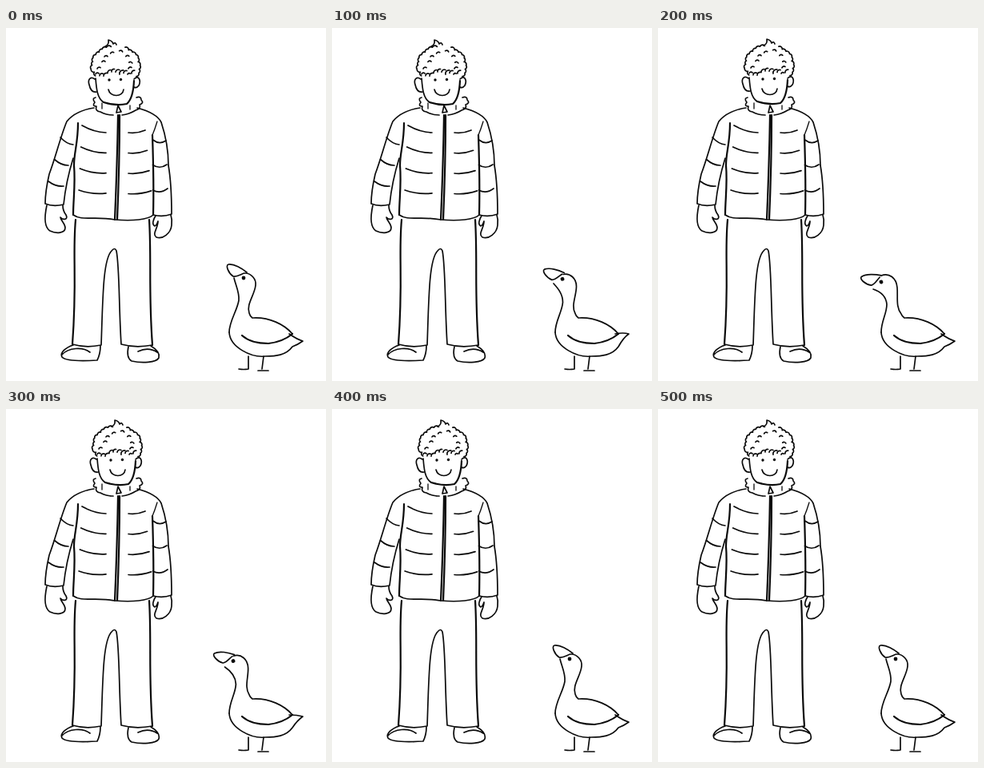
These frames come from a looping animation (400 by 442 pixels, 0.6 s). An HTML page:

```html
<!DOCTYPE html>
<html lang="en">
<head>
<meta charset="utf-8">
<title>Looking at the goose</title>
<style>
html, body { margin: 0; width: 100%; height: 100%; overflow: hidden; background: #fff; }
svg { display: block; width: 100vw; height: 100vh; }
path { fill: none; stroke: #0b0b0b; stroke-width: 1.7; stroke-linecap: round; stroke-linejoin: round; }
.bold { stroke-width: 2.2; }
.fine { stroke-width: 1.3; }
circle { fill: #0b0b0b; }
</style>
</head>
<body>
<svg viewBox="0 0 400 442">
  <g id="jacket">
    <path d="M110 100C97 102 84 107 76 117C68 136 62 162 54 183C51 196 49 208 49 220C56 223 64 223 72 221Q75 192 84 163"/>
    <path class="bold" d="M90 119C90 145 85 155 85 172C87 195 84 215 84 234"/>
    <path d="M84 234C95 242 110 235 136 240C158 242 178 240 184 234"/>
    <path d="M164 100C179 104 190 110 194 118C200 136 203 155 203 172C207 195 207 215 207 233Q196 237 184 234"/>
    <path class="bold" d="M183 134C184 165 185 195 184 234"/>
    <path class="fine" d="M189 117Q186 127 183 134"/>
    <path class="bold" d="M140 109Q139 170 136 240M142 109Q142 170 139 240"/>
    <path id="quilting"/>
  </g>
  <g id="mittens">
    <path d="M51 222C48 236 47 249 55 254C63 258 74 257 74 250C74 245 69 242 68 237C72 241 78 240 75 234Q71 229 71 222"/>
    <path d="M187 235C184 240 182 246 186 248C189 247 189 244 190 242C190 251 182 258 188 262C196 265 206 257 207 247Q208 240 206 234"/>
  </g>
  <g id="trousers">
    <path class="bold" d="M87 240C83 285 89 315 83 396M179 240C182 290 178 330 183 397"/>
    <path d="M83 396Q100 401 119 397C121 340 121 290 132 279Q136 274 138 279C142 300 141 350 144 396Q162 401 183 397"/>
    <path d="M84 397C75 400 67 406 70 412C75 417 98 417 114 416Q118 408 118 398M70 409C78 400 96 399 105 406"/>
    <path d="M153 399Q150 413 157 417C170 420 188 419 191 413C193 406 186 401 181 398M165 405Q178 399 189 406"/>
  </g>
  <g id="collar">
    <path d="M112 87Q107 88 111 93Q107 98 113 98Q111 104 118 105Q125 109 134 109M145 109Q154 108 162 103Q169 101 167 96Q173 94 169 90Q169 85 163 87"/>
    <path class="fine" d="M120 94V101M155 97V102"/>
    <path d="M138 106L140 97L144 105Z"/>
  </g>
  <g id="head">
    <path d="M112 63C113 76 114 88 122 93"/>
    <path class="bold" d="M122 93Q138 98 151 95Q159 88 160 66"/>
    <path d="M111 64C105 60 102 65 104 71Q106 81 113 80M160 64C166 58 169 66 166 72Q163 76 160 74"/>
    <path d="M128 77C130 87 146 87 147 77"/>
    <circle cx="129" cy="65" r="1.7"/><circle cx="143.5" cy="64.5" r="1.7"/>
    <path id="curls"/>
    <path id="tuft"/>
  </g>
  <g id="goose">
    <path d="M309 363C329 362 348 371 358 383"/>
    <path id="tail"/>
    <path class="bold" d="M295 385C305 394 318 395 328 395Q346 393 358 383"/>
    <path d="M303 411V427Q297 428 291 427M322 411L320 427M315 429H328"/>
    <path id="neck"/>
    <path id="throat"/>
    <g id="face">
      <path d="M4 -7C-2 -12 -12 -18 -19 -17C-23 -16 -19 -6 -13 -2C-8 -1 -3 -5 1 -6"/>
      <circle r="2.4"/>
    </g>
  </g>
</svg>
<script>
const $ = id => document.getElementById(id);
const draw = (id, d) => $(id).setAttribute('d', d);

let seed = 7;
const random = () => (seed = seed * 16807 % 2147483647) / 2147483647;
const jitter = size => (random() - 0.5) * size;

// A seam hangs below the line between its two ends.
const seam = (x1, y1, x2, y2, sag) =>
  `M${x1} ${y1}Q${(x1 + x2) / 2} ${(y1 + y2) / 2 + sag} ${x2} ${y2}`;

function quilting() {
  let d = '';
  for (let i = 0; i < 4; i++) {
    d += seam(95 - 1.3 * i, 122 + 27 * i, 125, 131 + 25.3 * i, 4);
    d += seam(153, 131 + 25.5 * i, 174 + 2.5 * i, 128 + 25.3 * i, 3);
  }
  for (let i = 0; i < 3; i++) {
    d += seam(68 - 7.5 * i, 137 + 27.5 * i, 84 - 6 * i, 146 + 26 * i, 4);
    d += seam(183.5, 140 + 31.5 * i, 200 + i, 141 + 30 * i, 6);
  }
  return d;
}

function curls() {
  const ring = (turn, scale) => {
    const a = Math.PI * turn;
    return [137 + 30 * scale * Math.cos(a), 47 + 24 * scale * Math.sin(a)];
  };
  const bump = ([x1, y1], [x2, y2]) => {
    const r = Math.hypot(x2 - x1, y2 - y1) * 0.6;
    return `M${x1} ${y1}A${r} ${r} 0 0 1 ${x2} ${y2}`;
  };
  let d = '', last = ring(0.82, 1);
  for (let i = 1; i <= 22; i++) {
    const next = ring(0.82 + i * 0.062, 1 + jitter(0.1));
    if (i < 11 || i > 13) d += bump(last, next);
    last = next;
  }
  // Loose locks along the forehead and over the crown.
  for (let x = 112; x < 161; x += 5) {
    const y = 53 + Math.abs(x - 136) * 0.15 + jitter(5);
    d += bump([x, y + 3], [x + 3 + random() * 2, y + jitter(5)]);
  }
  for (let i = 0; i < 8; i++) {
    const [x, y] = ring(0.95 + i * 0.16, 0.65 + jitter(0.35));
    d += bump([x - 2, y + jitter(3)], [x + 2, y + jitter(3)]);
  }
  return d;
}

draw('quilting', quilting());
draw('curls', curls());

// How far the goose leans towards the boots' owner in each step.
const leans = [0, 0.5, 1, 0.72, 0, 0];
const stepTime = 100;

function poseGoose(lean) {
  const mix = (a, b) => a + (b - a) * lean;
  const at = (x1, y1, x2, y2) => `${mix(x1, x2)} ${mix(y1, y2)} `;
  const eyeX = 297 - 18 * lean, eyeY = 313 + 5 * lean * lean;
  $('face').setAttribute('transform', `translate(${eyeX} ${eyeY}) rotate(${-27 * lean})`);

  const nape = at(312, 322, 299, 325);
  draw('neck', 'M' + at(299, 307, 279, 310) + 'C' + at(306, 307, 289, 306) + at(313, 314, 298, 313) + nape
    + 'C' + at(311, 334, 300, 337) + at(300, 346, 297, 349) + at(304, 357, 304, 358) + 'Q305 361 308 363');
  draw('throat', 'M' + at(285, 313, 269, 327) + 'C' + at(287, 322, 278, 330) + at(292, 331, 285, 335)
    + at(291, 341, 286, 346) + 'C' + at(289, 354, 286, 358) + '279 367 279 381');

  const tip = 392 - 9 * Math.sin(Math.PI * lean);
  draw('tail', `M354 383Q364 ${tip - 2} 371 ${tip}Q364 ${tip + 5} 358 399C350 410 337 411 324 411
    C307 413 280 400 279 381`);
}

function poseHead(lifted) {
  $('head').setAttribute('transform', `translate(${lifted * 2} ${-lifted})`);
  const x = 129 + 6 * lifted;
  draw('tuft', `M${x - 5} 23Q${x} 21 ${x - 1} 15Q${x + 4} 16 ${x + 5} 20Q${x + 8} 17 ${x + 9} 21`);
}

function render(time) {
  const step = Math.floor(time / stepTime) % leans.length;
  poseGoose(leans[step]);
  poseHead(step > 1 ? 1 : 0);
}

const start = performance.now();
function tick() {
  render(performance.now() - start);
  requestAnimationFrame(tick);
}
tick();
</script>
</body>
</html>
```
